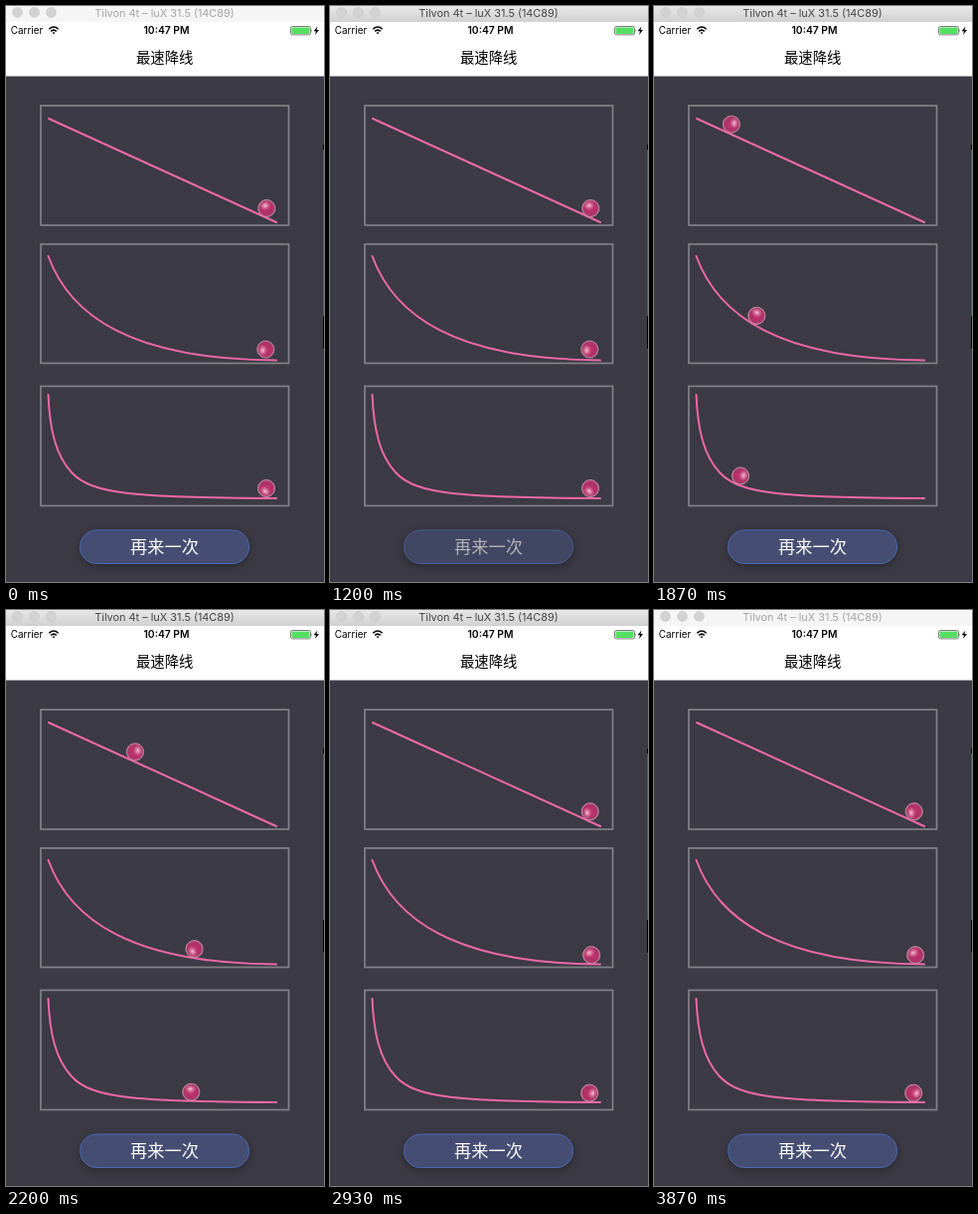
These frames come from a looping animation (320x578 px, 3940 ms). An HTML page:

```html
<!DOCTYPE html>
<html lang="zh">
<head>
<meta charset="utf-8">
<title>最速降线</title>
<style>
  html, body { margin: 0; width: 100%; height: 100%; overflow: hidden; background: #3c3a44; }
  svg { display: block; width: 100vw; height: 100vh; }
  text { font-family: Inter, Roboto, sans-serif; text-anchor: middle; }
  .cjk { font-family: "Noto Sans CJK SC", "Noto Sans CJK", sans-serif; }
  .frame { fill: none; stroke: #828188; stroke-width: 1.7; }
  .track { fill: none; stroke: #ec69a5; stroke-width: 2; stroke-linecap: round; }
  .active { animation: focus 3940ms step-end infinite; }
  .caption { fill: #a4a4a4; animation: caption 3940ms step-end infinite; }
  .label { fill: #fff; animation: label 3940ms linear infinite; }
  .pill { fill: #454d72; stroke: #4b69b4; animation: pill 3940ms linear infinite; }
  @keyframes focus { 0% { opacity: 0 } 27.16% { opacity: 1 } 81.2%, 100% { opacity: 0 } }
  @keyframes caption { 0% { fill: #a4a4a4 } 27.16% { fill: #444 } 81.2%, 100% { fill: #a4a4a4 } }
  @keyframes label { 0%, 30.4% { fill: #fff } 30.5%, 37.6% { fill: #a3a3ab } 43.2%, 100% { fill: #fff } }
  @keyframes pill {
    0%, 30.4% { fill: #454d72; stroke: #4b69b4 }
    30.5%, 37.6% { fill: #40455f; stroke: #465a95 }
    43.2%, 100% { fill: #454d72; stroke: #4b69b4 }
  }
</style>
</head>
<body>
<svg viewBox="0 0 320 578" preserveAspectRatio="none">
  <defs>
    <linearGradient id="bar" x2="0" y2="1">
      <stop offset="0" stop-color="#e8e7e8"/><stop offset="1" stop-color="#d2d1d2"/>
    </linearGradient>
    <radialGradient id="skin" cx=".5" cy=".5" r=".5">
      <stop offset="0" stop-color="#c23a72"/><stop offset=".55" stop-color="#b52f68"/>
      <stop offset=".85" stop-color="#a83a69"/><stop offset="1" stop-color="#cf7c9f"/>
    </radialGradient>
    <radialGradient id="shine">
      <stop offset="0" stop-color="#fbd3e2" stop-opacity=".9"/>
      <stop offset="1" stop-color="#e98bb2" stop-opacity="0"/>
    </radialGradient>
    <filter id="blur" x="-20%" y="-60%" width="140%" height="220%"><feGaussianBlur stdDeviation="5"/></filter>
    <g id="ball">
      <circle r="8.6" fill="url(#skin)" stroke="#c98aa3" stroke-width=".8"/>
      <ellipse cx="-3" cy="1" rx="4.6" ry="6" fill="url(#shine)"/>
    </g>
  </defs>

  <rect width="320" height="578" fill="#3c3a44"/>
  <rect width="320" height="70.5" fill="#fff"/>
  <rect width="320" height="16" fill="#f6f5f6"/>
  <rect class="active" width="320" height="16" fill="url(#bar)"/>
  <g fill="#d3d2d3" stroke="#c4c3c4" stroke-width=".5">
    <circle cx="11.5" cy="6.5" r="5"/><circle cx="28.5" cy="6.5" r="5"/><circle cx="45.5" cy="6.5" r="5"/>
  </g>
  <text class="caption" x="159.5" y="10.8" font-size="10.9">Tilvon 4t – luX 31.5 (14C89)</text>

  <text x="21" y="28.2" font-size="9.9">Carrier</text>
  <g fill="none" stroke="#000" stroke-width="1.5">
    <path d="M43.3 23.2Q48 18.8 52.7 23.2M45.2 25.4Q48 22.8 50.8 25.4"/>
    <path d="M46.6 26.7Q48 25.6 49.4 26.7L48 28.3Z" fill="#000" stroke="none"/>
  </g>
  <text x="161.5" y="28.4" font-size="10.3" font-weight="600">10:47 PM</text>
  <rect x="286.5" y="20.5" width="20" height="8.4" rx="1.8" fill="#fff" stroke="#444" stroke-width=".7"/>
  <rect x="287.5" y="21.5" width="18" height="6.4" rx="1" fill="#55df62"/>
  <path d="M307.3 23.2q1.2 1.5 0 3z" fill="#444"/>
  <path d="M313.4 20.4L309.6 25.2H312L311 29L315 23.9H312.5Z"/>
  <text class="cjk" x="159.7" y="57.2" font-size="14.4" font-weight="500">最速降线</text>

  <rect x="319" y="139" width="1" height="206" fill="#46595c"/>
  <path d="M319 139h1v5h-1zM319 311h1v33h-1z"/>

  <rect class="frame" x="35" y="100" width="249.5" height="120"/>
  <rect class="frame" x="35" y="239" width="249.5" height="119.5"/>
  <rect class="frame" x="35" y="381.5" width="249.5" height="120"/>
  <path class="track" d="M43 113L272 217"/>
  <path class="track" d="M42.5 251C64 310 125 355 272 355.5"/>
  <path class="track" d="M42.5 390C44 425 50 451 66 468C86 490 130 493.5 272 494"/>
  <g id="balls"></g>

  <rect x="74" y="529" width="171" height="33" rx="16.5" fill="#000" opacity=".32" filter="url(#blur)"/>
  <rect class="pill" x="74.5" y="526" width="170" height="33.5" rx="16.7"/>
  <text class="cjk label" x="159.5" y="549.2" font-size="17.2">再来一次</text>
</svg>
<script>
const LOOP = 3940, RESET = 1330, RELEASE = 1425, OFFSET = 9.2, STEP = 0.5;
const svgNS = "http://www.w3.org/2000/svg";

// rest: pose before the run; mid: [x, time] passed on the way; end: [x, time] of the stop
const runs = [
  { skip: 6, rest: [262.3, 203, 80], mid: [210, 2530], end: [261.3, 2700] },
  { skip: 8, rest: [261.3, 344.5, 0], mid: [103, 1870], end: [263, 2440] },
  { skip: 6, rest: [262, 484, -50], mid: [87, 1870], end: [261, 2440] }
];

// Centre of a ball resting on the track at arc length s
function centre(path, s) {
  const p = path.getPointAtLength(s);
  const a = path.getPointAtLength(s - 1), b = path.getPointAtLength(s + 1);
  const d = Math.hypot(b.x - a.x, b.y - a.y);
  return { x: p.x + OFFSET * (b.y - a.y) / d, y: p.y - OFFSET * (b.x - a.x) / d };
}

// Frictionless descent: speed follows from the height lost
function descend(path, run) {
  const start = centre(path, run.skip);
  const points = [{ ...start, t: 0, s: 0 }];
  let speed = 0, last = points[0];
  for (let s = run.skip + STEP; last.x < run.end[0]; s += STEP) {
    const c = centre(path, s);
    const next = Math.sqrt(Math.max(c.y - start.y, 0.01));
    const ds = Math.hypot(c.x - last.x, c.y - last.y);
    last = { ...c, t: last.t + 2 * ds / (speed + next), s: last.s + ds };
    points.push(last);
    speed = next;
  }
  const mid = points.find(p => p.x >= run.mid[0]).t, end = last.t;
  for (const p of points) {
    p.t = p.t < mid
      ? RELEASE + (run.mid[1] - RELEASE) * p.t / mid
      : run.mid[1] + (run.end[1] - run.mid[1]) * (p.t - mid) / (end - mid);
  }
  return points;
}

function poseAt(run, time) {
  if (time < RESET) return run.rest;
  const pts = run.points;
  let i = pts.findIndex(p => p.t > time);
  if (i < 0) i = pts.length - 1;
  const b = pts[i], a = pts[Math.max(i - 1, 0)];
  const k = b.t > a.t ? Math.min(1, Math.max(0, (time - a.t) / (b.t - a.t))) : 0;
  const mix = key => a[key] + (b[key] - a[key]) * k;
  return [mix("x"), mix("y"), mix("s") / OFFSET * 180 / Math.PI];
}

document.querySelectorAll(".track").forEach((path, i) => {
  const run = runs[i];
  run.points = descend(path, run);
  run.node = document.createElementNS(svgNS, "use");
  run.node.setAttribute("href", "#ball");
  document.getElementById("balls").append(run.node);
});

function draw(time) {
  for (const run of runs) {
    const [x, y, angle] = poseAt(run, time);
    run.node.setAttribute("transform", `translate(${x} ${y}) rotate(${angle})`);
  }
}

let began;
function tick(now) {
  began ??= now;
  draw((now - began) % LOOP);
  requestAnimationFrame(tick);
}
draw(0);
requestAnimationFrame(tick);
</script>
</body>
</html>
```
